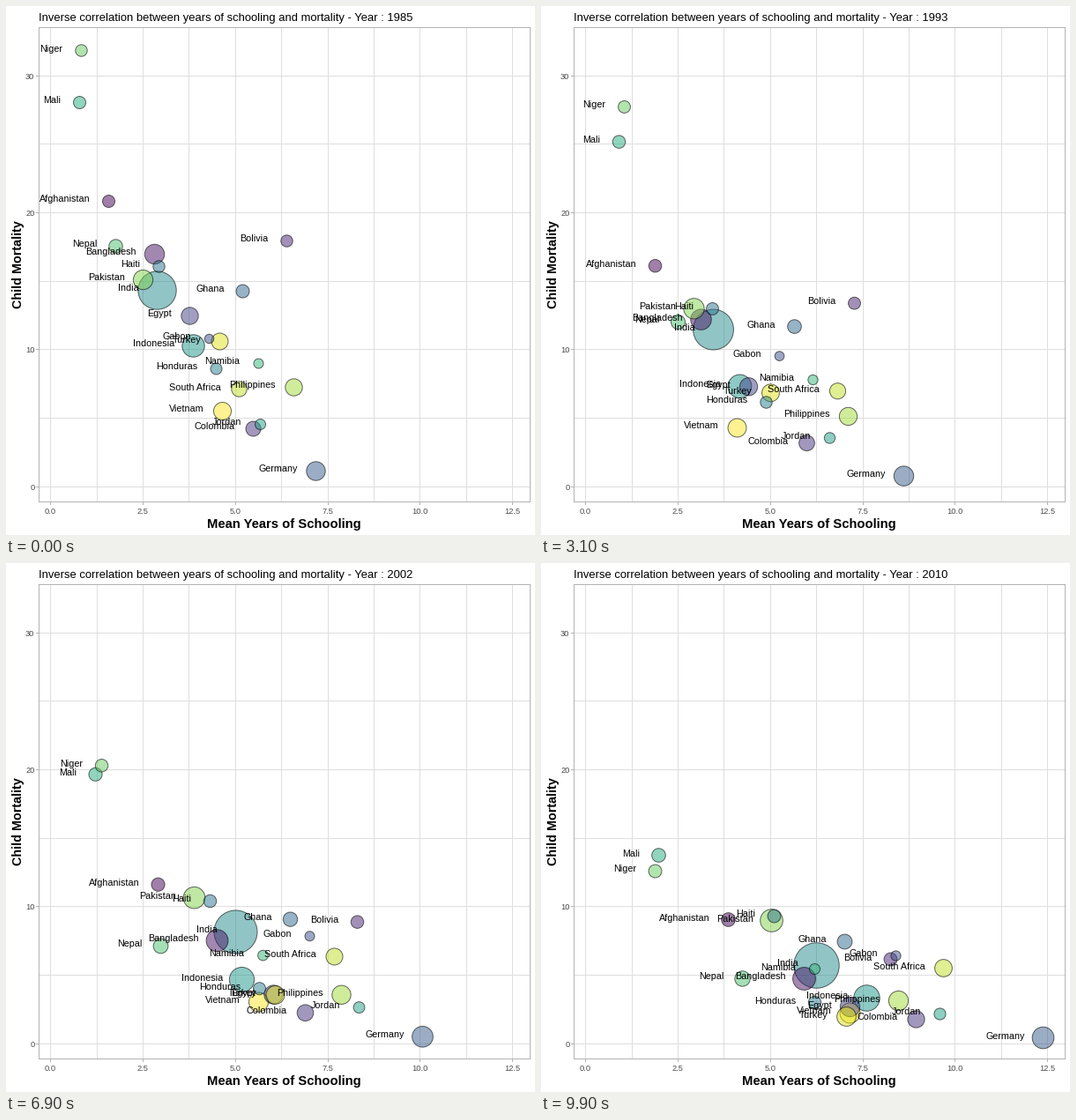
These frames come from a looping animation (600 px wide and 600 px high, 10 s). A matplotlib script:

```python
import matplotlib.pyplot as plt
import numpy as np
from matplotlib.animation import FuncAnimation
from matplotlib.patches import Circle

SIZE, DPI, FRAMES = 600, 100, 100
PX = 72 / DPI  # points per pixel
FIRST, LAST = 1985, 2010
GRID, EDGE, TICK = "#dedede", "#b3b3b3", "#4d4d4d"
LEFT, TOP, RIGHT, BOTTOM = 37, 24, 594, 562

plt.rcParams["font.family"] = "Liberation Sans"

fig = plt.figure(figsize=(SIZE / DPI, SIZE / DPI), dpi=DPI, facecolor="white")
ax = fig.add_axes([0, 0, 1, 1])
ax.set(xlim=(0, SIZE), ylim=(SIZE, 0))
ax.axis("off")

time = np.linspace(0, 1, FRAMES)
surveys = np.arange(FIRST, LAST + 1, 5)
years = np.arange(FIRST, LAST + 1)
year_frames = np.round((FRAMES - 1) * (years - FIRST) / (LAST - FIRST))


def label(x, y, s, px, **kw):
    return ax.text(x, y, s, fontsize=px * PX, zorder=5,
                   **{"va": "baseline", **kw})


def line(x0, y0, x1, y1, color, z):
    """One pixel wide, centred on whole pixels."""
    ax.plot(np.round([x0, x1]) + 0.5, np.round([y0, y1]) + 0.5, color=color,
            lw=PX, zorder=z, snap=False, solid_capstyle="projecting")


def schooling(x85, x90, x00, x10):
    """Each survey value holds for five years, then moves during the last one."""
    found = np.interp(surveys, [1985, 1990, 2000, 2010], [x85, x90, x00, x10])
    yearly = found[(years - FIRST) // 5]
    return np.interp(np.arange(FRAMES), year_frames, yearly)


def mortality(start, middle, end):
    """Parabola through the first, middle and last value."""
    return np.polyval(np.polyfit([0, 0.5, 1], [start, middle, end], 2), time)


def draw_axes():
    for i in range(11):
        x = 50.12 + 52.42 * i
        line(x, TOP, x, BOTTOM, GRID, 1)
        if i % 2 == 0:
            line(x, BOTTOM, x, BOTTOM + 3, EDGE, 2)
            label(x + 0.3, 576, f"{i * 1.25:.1f}", 9.3, color=TICK, ha="center")
    for j in range(7):
        y = 544.7 - 77.68 * j
        line(LEFT, y, RIGHT, y, GRID, 1)
        if j % 2 == 0:
            line(LEFT - 3, y, LEFT, y, EDGE, 2)
            label(32.5, y + 4, str(5 * j), 9.3, color=TICK, ha="right")
    for x in (LEFT, RIGHT):
        line(x, TOP, x, BOTTOM, EDGE, 2)
    for y in (TOP, BOTTOM):
        line(LEFT, y, RIGHT, y, EDGE, 2)
    label(315, 592, "Mean Years of Schooling", 14.8, weight="bold", ha="center")
    label(21.5, 293, "Child Mortality", 14.4, weight="bold", rotation=90,
          ha="right", va="center")


bubbles = []
viridis = plt.get_cmap("viridis")


def country(name, r, xs, ys):
    color = viridis(len(bubbles) / 21)[:3]
    # Small bubbles lie on top of large ones.
    dot = Circle((0, 0), r, fc=(*color, 0.5), ec=(0, 0, 0, 0.58), lw=PX,
                 zorder=4 - r / 100)
    ax.add_patch(dot)
    text = label(0, 0, name, 10.8, ha="right")
    radius = r + (0.22 * r - 0.8) * time - 0.3
    bubbles.append((dot, text, schooling(*xs) + 0.5, mortality(*ys) + 0.5, radius))


draw_axes()
title = label(37, 17, "", 13.03)

country("Afghanistan", 7.3, (116, 129, 172, 212), (221, 331, 404))
country("Bangladesh", 11.5, (168, 181, 239, 298), (281, 393, 471))
country("Bolivia", 7, (318, 355, 398, 396), (266, 373, 449))
country("Colombia", 8.8, (280, 301, 339, 425), (479, 503, 517))
country("Egypt", 10, (208, 235, 303, 350), (351, 465, 503))
country("Gabon", 5.5, (230, 270, 344, 402), (377, 409, 445))
country("Germany", 11, (351, 411, 472, 569), (527, 535, 538))
country("Ghana", 7.8, (268, 287, 322, 344), (323, 384, 429))
country("Haiti", 7, (173, 194, 231, 264), (295, 365, 400))
country("Honduras", 6.8, (238, 255, 287, 310), (411, 467, 498))
country("India", 22, (171, 195, 260, 312), (322, 392, 456))
country("Indonesia", 13, (212, 225, 267, 369), (385, 453, 493))
country("Jordan", 6.3, (288, 327, 400, 452), (474, 497, 511))
country("Mali", 7.3, (83, 88, 101, 133), (109, 191, 331))
country("Namibia", 5.8, (286, 308, 291, 310), (405, 434, 460))
country("Nepal", 8, (124, 155, 175, 228), (272, 399, 471))
country("Niger", 7, (85, 94, 108, 129), (50, 165, 349))
country("Pakistan", 11.4, (155, 173, 213, 261), (310, 361, 405))
country("Philippines", 10, (326, 348, 380, 405), (432, 479, 496))
country("South Africa", 9, (264, 336, 372, 456), (434, 440, 459))
country("Turkey", 9.8, (242, 260, 305, 346), (380, 466, 514))
country("Vietnam", 10.3, (245, 222, 286, 350), (459, 488, 510))


def draw(k):
    year = round(FIRST + (LAST - FIRST) * time[k])
    title.set_text("Inverse correlation between years of schooling "
                   f"and mortality - Year : {year}")
    for dot, text, xs, ys, radius in bubbles:
        dot.center = xs[k], ys[k]
        dot.radius = radius[k]
        text.set_position((xs[k] - 21, ys[k] + 1))
    return []


anim = FuncAnimation(fig, draw, frames=FRAMES, interval=100, repeat=True,
                     repeat_delay=0, blit=False)
plt.show()
```
